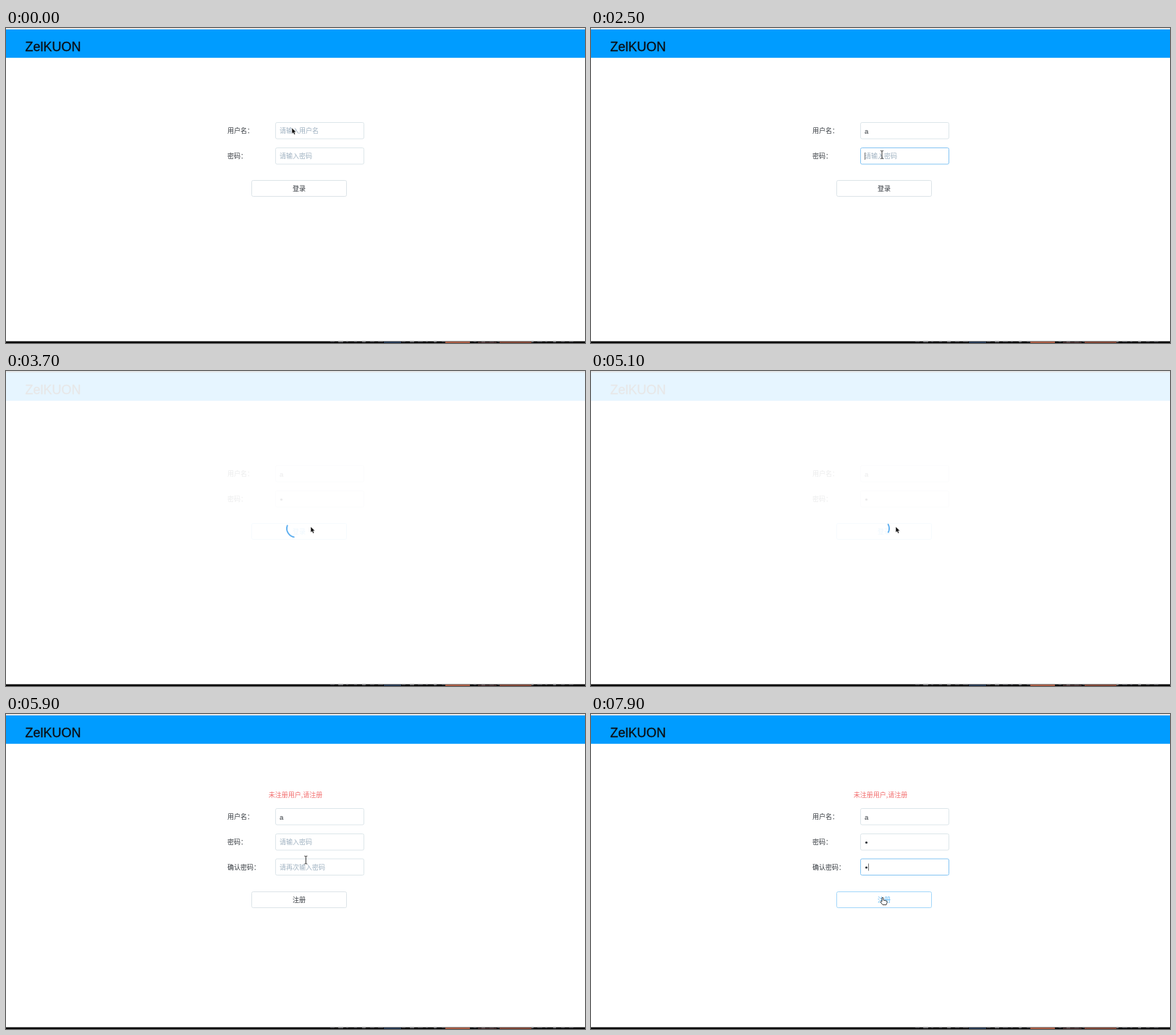
Animation, 800 px wide and 435 px high, one loop 8 s. Source, as an HTML page:

```html
<!DOCTYPE html>
<html lang="zh-CN">
<head>
<meta charset="utf-8">
<style>
html, body { margin: 0; width: 100%; height: 100%; overflow: hidden; background: #fff; }
svg { display: block; width: 800px; height: 435px; }
text { font: 9px "Noto Sans CJK SC", "Noto Sans CJK", sans-serif; fill: #30353b; white-space: pre; }
.label { font-weight: 500; }
.brand { font: 18px "Liberation Sans", Arial, sans-serif; fill: #0b0f14; stroke: #0b0f14; stroke-width: .3px; }
.typed { font: 9.5px "Liberation Sans", Arial, sans-serif; }
.hint { fill: #9cafbf; }
.error { fill: #f26b6b; }
.mid { text-anchor: middle; }
</style>
</head>
<body>
<svg id="stage" viewBox="0 0 800 435"></svg>
<script>
const LOOP = 8000, STEP = 100;
const SEND = 3292, SPIN = 3385, REPLY = 5323;
const stage = document.getElementById('stage');

// Pointer path: time, x, y
const path = [
  [0, 395, 138], [400, 401, 143], [1700, 401, 143], [2200, 402, 175],
  [2700, 402, 175], [3200, 418, 216], [3400, 418, 216], [3600, 421, 215],
  [5700, 421, 215], [6200, 402, 177], [6500, 402, 177], [6700, 402, 208],
  [7400, 402, 208], [7800, 403, 253], [LOOP, 403, 253]
];

const clamp = v => Math.max(0, Math.min(1, v));
const fade = v => 1 - (1 - clamp(v)) ** 2.2;
const smooth = v => v * v * (3 - 2 * v);
const within = (v, a, b) => v >= a && v < b;

function pointerAt(t) {
  const i = path.findIndex(p => p[0] > t);
  const [t0, x0, y0] = path[i - 1], [t1, x1, y1] = path[i];
  const k = smooth((t - t0) / (t1 - t0));
  return [x0 + (x1 - x0) * k, y0 + (y1 - y0) * k];
}

const text = (x, y, cls, s, extra = '') => `<text x="${x}" y="${y}" class="${cls}" ${extra}>${s}</text>`;
const rect = (x, y, w, h, fill, extra = '') =>
  `<rect x="${x}" y="${y}" width="${w}" height="${h}" fill="${fill}" ${extra}/>`;

function field(y, label, hint, value, focusAge) {
  const focused = focusAge >= 0;
  let s = text(306, y + 15, 'label', label) +
    rect(372.5, y + .5, 122, 22.5, '#fff', `rx="2" stroke="${focused ? '#86c5f3' : '#dde6ea'}"`);
  if (value === '•') s += `<circle cx="380.5" cy="${y + 12.5}" r="1.6" fill="#30353b"/>`;
  else s += value ? text(378, y + 15.5, 'typed', value) : text(378, y + 15, 'hint', hint);
  if (focused && focusAge % 1000 < 500)
    s += rect(value ? 383 : 378, y + 7, .8, 10, '#555');
  return s;
}

function button(y, label, active) {
  return rect(339.5, y + .5, 131, 22, '#fff', `rx="2" stroke="${active ? '#a3d7fa' : '#dde4e8'}"`) +
    text(405, y + 15, 'label mid', label, active ? 'style="fill:#55b4f5"' : '');
}

function form(t) {
  const signUp = t >= REPLY;
  const age = (from, to) => within(t, from, to) ? t - from : -1;
  const name = t >= 1300 ? 'a' : '';
  const pass = within(t, 2800, REPLY) || t >= 6900 ? '•' : '';
  const passAge = signUp ? age(6500, 7200) : age(2400, 3200);
  const nameAge = t < 1300 ? age(500, 1300) : age(1300, 2400);
  let s = field(130, '用户名：', '请输入用户名', name, nameAge) +
    field(165, '密码：', '请输入密码', pass, passAge);
  if (!signUp) return s + button(210, '登录', t >= 3100);
  const confirmAge = t < 7500 ? age(7200, 7500) : t - 7500;
  return s + text(400, 114.5, 'error mid', '未注册用户,请注册') +
    field(199.5, '确认密码：', '请再次输入密码', t >= 7500 ? '•' : '', confirmAge) +
    button(245, '注册', t < 5600 || t >= 7700);
}

function spinner(t) {
  const age = t - SPIN, p = age % 1500 / 750;
  const k = smooth(p % 1);
  const dash = p < 1 ? 1 + 89 * k : 90;
  const shift = p < 1 ? 40 * k : 40 + 80 * k;
  return `<circle cx="400" cy="217.5" r="12" fill="none" stroke="#5caeef" stroke-width="1.8" stroke-linecap="round"
    pathLength="126" stroke-dasharray="${dash} 150" stroke-dashoffset="${-shift}"
    transform="rotate(${age * .18} 400 217.5)"/>`;
}

function overlay(t) {
  const a = fade((t - SEND) / 300) - fade((t - REPLY) / 300);
  if (a <= 0) return '';
  return `<g opacity="${a}">${rect(0, 2, 800, 431, '#fff', 'opacity=".9"')}${t >= SPIN ? spinner(t) : ''}</g>`;
}

function pointer(t) {
  const [x, y] = pointerAt(t);
  const arrow = t < 200 || within(t, 3200, 5700);
  const overField = within(x, 372, 495) &&
    [130, 165].concat(t >= REPLY ? 199.5 : []).some(top => within(y, top, top + 23));
  const overButton = within(y, ...(t >= REPLY ? [245, 268] : [210, 233]));
  let d, style = 'fill="#111" stroke="#fff" stroke-width=".5"';
  if (!arrow && overField) {
    d = 'M-2-5.5Q0-5.5 0-4.5Q0-5.5 2-5.5M0-4.5V4.5M-2 5.5Q0 5.5 0 4.5Q0 5.5 2 5.5';
    style = 'fill="none" stroke="#333" stroke-width="1"';
  } else if (!arrow && overButton) {
    d = 'M-1 1Q0-.5 1 1V4L5 5Q6.5 5.5 6 7.5L5 10.5H0L-3 6.5Q-3 5-1 6Z';
    style = 'fill="#fff" stroke="#333" stroke-width=".9"';
  } else d = 'M0 0V8L1.9 6.4L3.2 9.3L4.7 8.6L3.5 5.8H6Z';
  return `<path d="${d}" ${style} transform="translate(${x} ${y})"/>`;
}

// Sliver of the desktop below the window
function desktop() {
  let s = rect(0, 432.6, 800, 2.4, '#000');
  for (let x = 448; x < 780; x += 11)
    s += rect(x, 433, 3 + x % 5, 1, x % 3 ? '#3a3a40' : '#77777c');
  return s + rect(522, 433, 24, 2, '#24374f') + rect(607, 433, 34, 2, '#a65a42') +
    rect(652, 433.5, 26, 1.5, '#4a3030') + rect(682, 433, 44, 2, '#7d4435');
}

const frame = rect(0, 0, 800, 435, '#fff') + rect(0, 0, 800, 2, '#e3e6e8');
const header = rect(0, 2, 800, 39, '#009cff') + rect(0, 41, 800, 1, '#d5edfb') +
  text(26.5, 32, 'brand', 'ZelKUON');
const footer = desktop();

let last = -1;
function draw(now) {
  const t = Math.floor(now % LOOP / STEP) * STEP;
  if (t !== last) {
    stage.innerHTML = frame + header + form(t) + overlay(t) + footer + pointer(t);
    last = t;
  }
}
const start = performance.now();
function tick() {
  draw(performance.now() - start);
  requestAnimationFrame(tick);
}
tick();
</script>
</body>
</html>
```
